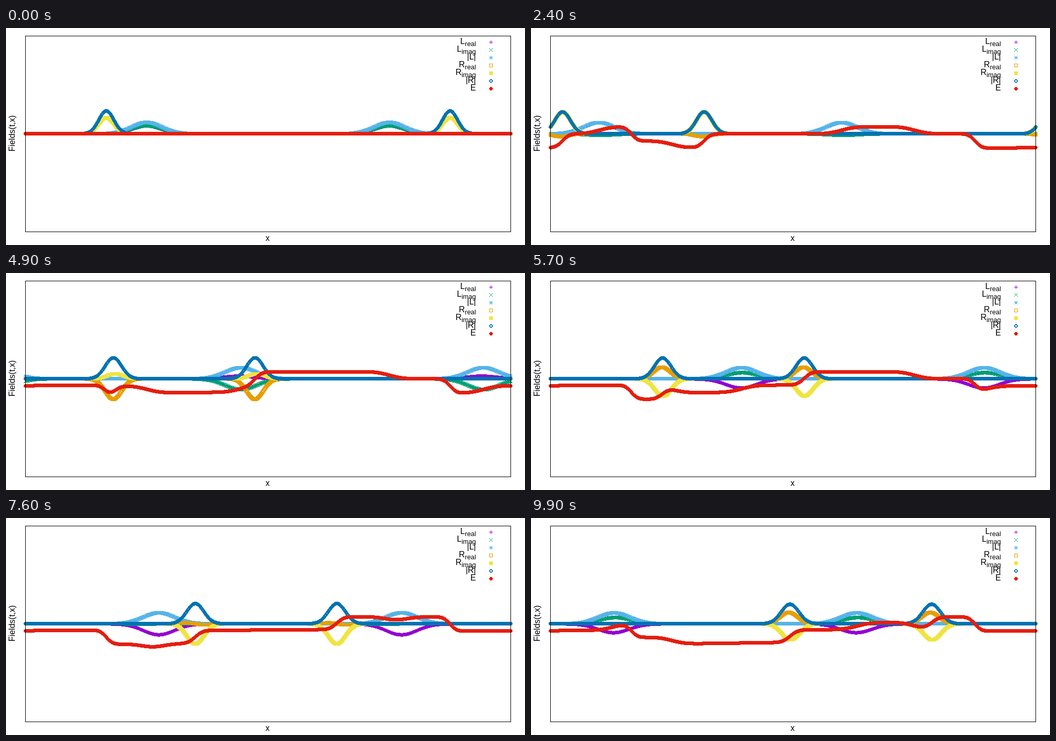
These frames come from a looping animation (1000 by 420 pixels, 10 s). An HTML page with a canvas:

```html
<!DOCTYPE html>
<html lang="en">
<head>
<meta charset="utf-8">
<title>Fields(t,x)</title>
<style>
  html, body { margin: 0; width: 100%; height: 100%; overflow: hidden; background: #fff; }
  .stage { position: relative; width: 1000px; height: 420px; }
  canvas, svg { position: absolute; left: 0; top: 0; }
  text { font: 16px "Liberation Sans", Arial, sans-serif; }
  .sub { font-size: 12.8px; }
</style>
</head>
<body>
<div class="stage">
  <canvas width="1000" height="420"></canvas>
  <svg width="1000" height="420">
    <text x="504" y="412" text-anchor="middle">x</text>
    <text transform="translate(17 204) rotate(-90)" text-anchor="middle">Fields(t,x)</text>
    <g id="legend" text-anchor="end"></g>
  </svg>
</div>
<script>
const LEFT = 37, WIDTH = 935, TOP = 15, HEIGHT = 379, ZERO = 204.3;
const FRAMES = 100, FRAME_MS = 100;
const STEP = WIDTH / 160;       // packet travel per frame
const PHASE_STEP = 0.2997;      // phase rotation per frame, in radians
const SPREAD = 0.78;            // growth of the squared width per frame
const CHIRP = 0.017;            // phase tilt across a packet
const COUPLING = 0.00322;       // field produced by the current per frame

const rightMovers = { dir: 1, amp: 44.2, sigma: WIDTH / 64, starts: [1 / 6, 7 / 8] };
const leftMovers = { dir: -1, amp: 22, sigma: WIDTH / 32, starts: [1 / 4, 3 / 4] };

// Marker shapes as [dx, dy, width, height] rectangles
const dot = (x, y) => [x, y, 1, 1];
const plus = [[-3, 0, 7, 1], [0, -3, 1, 7]];
const cross = [-3, -2, -1, 0, 1, 2, 3].flatMap(i => [dot(i, i), dot(i, -i)]);
const openBox = [[-3, -3, 7, 1], [-3, 3, 7, 1], [-3, -2, 1, 5], [3, -2, 1, 5]];
const fullBox = [[-3, -3, 7, 7]];
const ring = [[-1, -3, 3, 2], [-1, 2, 3, 2], [-3, -1, 2, 3], [2, -1, 2, 3],
  dot(-2, -2), dot(2, -2), dot(-2, 2), dot(2, 2)];
const disc = [[-1, -3, 3, 7], [-2, -2, 5, 5], [-3, -1, 7, 3]];

const series = [
  { name: 'L', sub: 'real', color: '#9400d3', marker: plus },
  { name: 'L', sub: 'imag', color: '#009e73', marker: cross },
  { name: '|L|', color: '#56b4e9', marker: [...plus, ...cross] },
  { name: 'R', sub: 'real', color: '#e69f00', marker: openBox },
  { name: 'R', sub: 'imag', color: '#f0e442', marker: fullBox },
  { name: '|R|', color: '#0072b2', marker: ring },
  { name: 'E', color: '#e51e10', marker: disc }
];

const wrap = d => d - WIDTH * Math.round(d / WIDTH);

// Complex value of a travelling, slowly spreading pair of packets
function wave({ dir, amp, sigma, starts }, x, n) {
  const variance = sigma * sigma + SPREAD * n;
  const height = amp * sigma / Math.sqrt(variance);
  let re = 0, im = 0;
  for (const start of starts) {
    const d = wrap(x - start * WIDTH - dir * STEP * n);
    const size = height * Math.exp(-d * d / (2 * variance));
    const phase = Math.PI / 4 + dir * PHASE_STEP * n - d * CHIRP * n / variance;
    re += size * Math.cos(phase);
    im += size * Math.sin(phase);
  }
  return { re, im, abs: Math.hypot(re, im) };
}

// Electric field for each frame, accumulated from the current
const field = [new Float32Array(WIDTH + 1)];
for (let n = 1; n < FRAMES; n++) {
  field[n] = field[n - 1].map((e, x) =>
    e - COUPLING * (wave(rightMovers, x, n - 0.5).abs ** 2 - wave(leftMovers, x, n - 0.5).abs ** 2));
}

const ctx = document.querySelector('canvas').getContext('2d');

function stamp(marker, x, y) {
  for (const [dx, dy, w, h] of marker) ctx.fillRect(x + dx, y + dy, w, h);
}

function draw(n) {
  ctx.fillStyle = '#fff';
  ctx.fillRect(0, 0, 1000, 420);
  const curves = series.map(() => []);
  for (let x = 0; x <= WIDTH; x++) {
    const l = wave(leftMovers, x, n), r = wave(rightMovers, x, n);
    [l.re, l.im, l.abs, r.re, r.im, r.abs, field[n][x]].forEach((v, i) => curves[i].push(v));
  }
  series.forEach(({ color, marker }, i) => {
    ctx.fillStyle = color;
    curves[i].forEach((v, x) => stamp(marker, LEFT + x, Math.round(ZERO - v)));
    stamp(marker, 934, 27 + 15 * i);
  });
  ctx.strokeStyle = '#000';
  ctx.strokeRect(LEFT + 0.5, TOP + 0.5, WIDTH, HEIGHT);
}

document.getElementById('legend').innerHTML = series.map(({ name, sub }, i) => {
  const tail = sub ? `<tspan class="sub" dy="4">${sub}</tspan>` : '';
  return `<text x="905.5" y="${31 + 15 * i}">${name}${tail}</text>`;
}).join('');

let shown = -1;
const begin = performance.now();
function tick() {
  const n = Math.floor((performance.now() - begin) / FRAME_MS) % FRAMES;
  if (n !== shown) draw(shown = n);
  requestAnimationFrame(tick);
}
tick();
</script>
</body>
</html>
```
